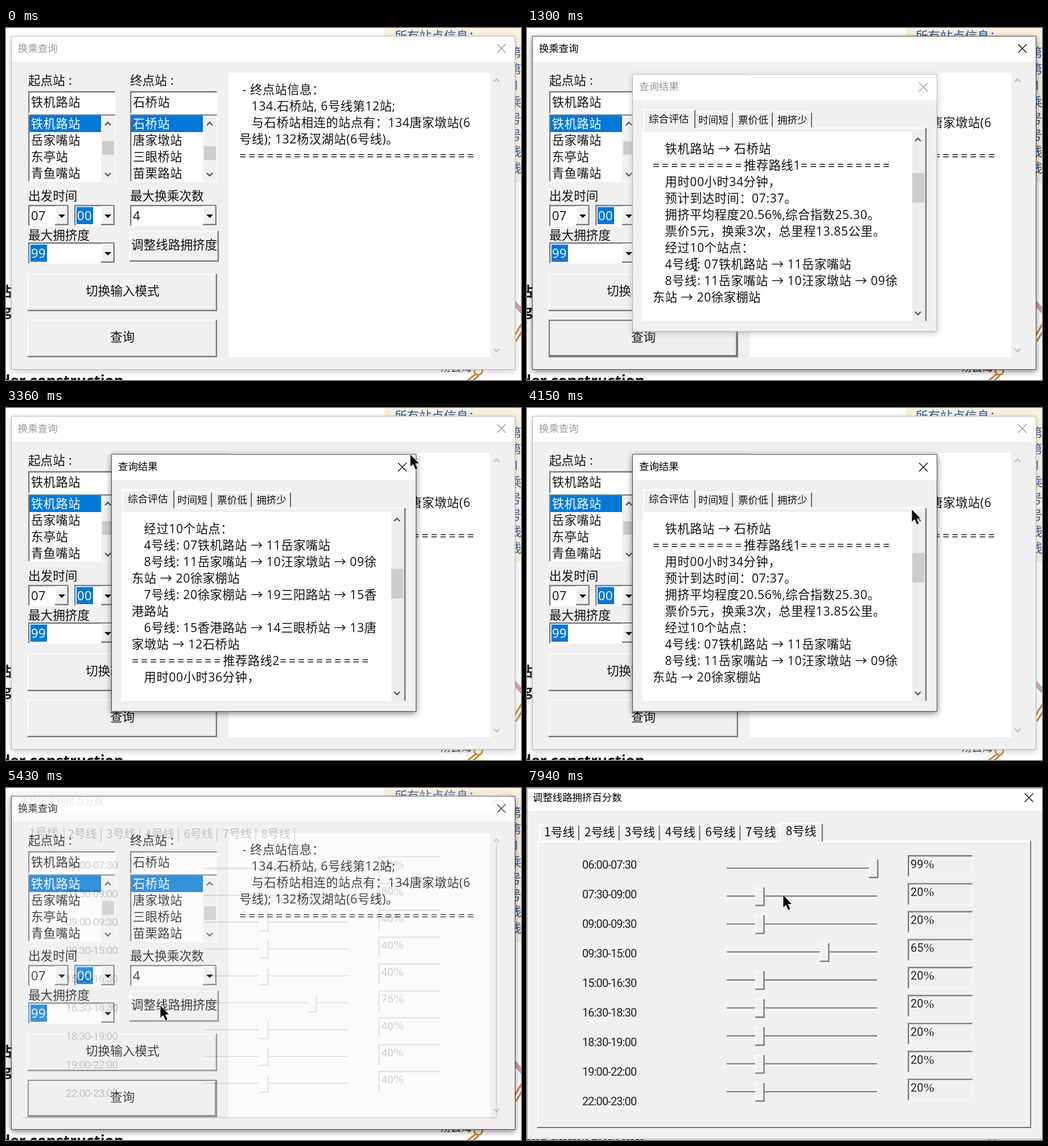
Animation, 905 px wide and 619 px high, one loop 8 s. Source, as an HTML page:

```html
<!DOCTYPE html>
<html lang="zh-CN">
<head>
<meta charset="utf-8">
<title>换乘查询</title>
<style>
  html, body { margin: 0; width: 100%; height: 100%; overflow: hidden; background: #fff; }
  svg { display: block; width: 905px; height: 619px; }
  text { font-family: "Open Sans", "Noto Sans CJK SC", "Noto Sans CJK", sans-serif; }
  .cjk { font-family: "Noto Sans CJK SC", "Noto Sans CJK", sans-serif; }
  .num { font-family: Roboto, sans-serif; }
  .pct { font-family: "Liberation Serif", serif; }
</style>
</head>
<body>
<svg id="stage" viewBox="0 0 905 619"></svg>
<script>
const LOOP = 8000, STEP = LOOP / 104;
const FACE = '#f0f0f0', DARK = '#7c7c7c', BLUE = '#0078d7';

// ---- drawing helpers ----
const rect = (x, y, w, h, fill, extra = '') =>
  `<rect x="${x}" y="${y}" width="${w}" height="${h}" fill="${fill}" ${extra}/>`;
const line = (d, stroke, w = 2, extra = '') =>
  `<path d="${d}" fill="none" stroke="${stroke}" stroke-width="${w}" ${extra}/>`;
// text placed by its left edge and vertical centre
const text = (x, cy, s, size = 21.2, extra = 'fill="#111" letter-spacing=".6"') =>
  `<text x="${x}" y="${cy + size * .33}" font-size="${size}" ${extra}>${s}</text>`;
const label = (x, cy, s, size = 21.6) => text(x, cy + size * .04, s, size, 'class="cjk" fill="#111"');

function bevel(x, y, w, h, fill, lit, shade, litWidth, shadeWidth) {
  const r = x + w, b = y + h, p = litWidth / 2, q = shadeWidth / 2;
  return rect(x, y, w, h, fill) +
    line(`M${x + p} ${b}V${y + p}H${r}`, lit, litWidth) +
    line(`M${r - q} ${y}V${b - q}H${x}`, shade, shadeWidth);
}
const sunk = (x, y, w, h, fill = '#fff') => bevel(x, y, w, h, fill, DARK, '#f8f8f8', 2.4, 1.5);
const raised = (x, y, w, h) => bevel(x, y, w, h, FACE, '#fff', DARK, 1.5, 2.4);
const chevron = (x, y, dir, color = '#555') =>
  line(`M${x - 5} ${y + 3 * dir}L${x} ${y - 2 * dir}L${x + 5} ${y + 3 * dir}`, color, 2.4);
const cross = (x, y) =>
  `<path d="M${x - 7.5} ${y - 7.5}l15 15m0-15l-15 15" fill="none" stroke="currentColor" stroke-width="1.3"/>`;
const title = (x, y, s) => text(x, y + .7, s, 17.4, 'class="cjk" fill="currentColor"');

function paragraph(x, cy, lines) {
  return lines.map((s, i) => {
    const indent = s.length - s.trimStart().length;
    const body = s.trim().replace(/=+/g, m => `<tspan letter-spacing="3.9">${m}</tspan>`);
    return text(x + indent * 5.4, cy + 29 * i, body);
  }).join('');
}

// border and shadow follow the title colour, so an inactive window looks lighter
function frame(x, y, w, h, bar) {
  return rect(x, y + 3, w, h, 'currentColor', 'opacity=".5" filter="url(#soft)"') +
    rect(x, y, w, h, FACE) + rect(x, y, w, bar, '#fff') +
    rect(x + .5, y + .5, w - 1, h - 1, 'none', 'stroke="currentColor" stroke-opacity=".7"');
}

// ---- map behind the windows ----
function backdrop() {
  const bold = 'font-weight="700" fill="#111"', blue = 'fill="#2350a0" font-weight="500"';
  const side = '第第1乘号号线线';
  return rect(0, 0, 905, 619, '#fff') + rect(665, 0, 240, 272, '#faf1de') +
    text(683, 14.5, '所有站点信息：', 21.6, blue) +
    [...side].map((c, i) => text(c === '1' ? 890 : 884, 43.5 + 29 * i, c, 21.6, blue)).join('') +
    text(-14, 464, '站', 24, bold) + text(-21, 498, 'ng', 25, bold) +
    text(-9, 621, 'der construction', 26, bold) +
    text(763, 598, '汤云海', 18.5, 'fill="#222"') +
    line('M890 480L910 502', '#cfa0b4', 8) +
    line('M908 517L890 547M914 521L896 551', '#d08030', 3) +
    line('M825 609L806 624M831 611L816 624', '#d08030', 3) +
    `<circle cx="830" cy="603" r="7" fill="#fff" stroke="#d08030" stroke-width="3"/>`;
}

// ---- query window ----
function station(x, name, items, thumbY) {
  let s = label(x, 92, name) + label(x + 71, 92, ':') +
    sunk(x, 111, 154, 40) + text(x + 5, 131, items[0]) +
    sunk(x, 152, 154, 119) + rect(x + 2, 154, 126, 29, BLUE) + rect(x + 128, 154, 24, 115, FACE) +
    rect(x + 130, thumbY, 21, 24, '#cdcdcd') + chevron(x + 140, 168, 1) + chevron(x + 140, 258, -1);
  items.forEach((it, i) => s += text(x + 5, 169 + 29 * i, it, 21.2,
    `letter-spacing=".6" fill="${i ? '#111' : '#fff'}"`));
  return s;
}

function combo(x, y, w, value, picked) {
  const cx = x + w - 13, cy = y + 19;
  return sunk(x, y, w, 38) + raised(x + w - 25, y + 2, 24, 34) +
    `<path d="M${cx - 6} ${cy - 2}h12l-6 6z"/>` +
    (picked ? rect(x + 4, y + 4, 29, 30, BLUE) : '') +
    text(x + 5, cy + .5, value, 22, `fill="${picked ? '#fff' : '#111'}" letter-spacing=".4"`);
}

const button = (x, y, w, h, tx, s) => raised(x, y, w, h) + label(tx, y + h / 2 - 2.5, s);

function queryWindow() {
  return `<g id="mainBar">${frame(9, 14, 886, 587, 45)}${title(21, 36, '换乘查询')}${cross(870.5, 36)}</g>` +
    station(39, '起点站', ['铁机路站', '岳家嘴站', '东亭站', '青鱼嘴站'], 199) +
    station(218, '终点站', ['石桥站', '唐家墩站', '三眼桥站', '苗栗路站'], 208) +
    label(39, 295, '出发时间') + combo(39, 311, 72, '07') + combo(120, 311, 72, '00', true) +
    label(218, 295, '最大换乘次数') + combo(218, 311, 153, '4') +
    label(39, 364, '最大拥挤度') + combo(39, 377, 153, '99', true) +
    button(217, 357, 157, 54, 220, '调整线路拥挤度') +
    button(38, 432, 333, 66, 140, '切换输入模式') +
    button(38, 513, 333, 66, 183, '查询') +
    `<g id="focus">${rect(39, 514, 331, 64, 'none', 'stroke="#777" stroke-width="2"')}${
      line('M368 516V576H40', DARK, 2)}</g>` +
    rect(391, 79, 460, 500, '#fff') + chevron(862, 92, 1, '#bdbdbd') + chevron(862, 567, -1, '#bdbdbd') +
    paragraph(410, 109, [
      ' - 终点站信息：', '    134.石桥站, 6号线第12站;',
      '    与石桥站相连的站点有：134唐家墩站(6', '号线); 132杨汊湖站(6号线)。', '='.repeat(26)]);
}

// ---- result window ----
const bar = '='.repeat(10);
const report = [
  ' - 起点站信息：', '    93.铁机路站, 4号线第7站;',
  '    与铁机路站相连的站点有：06罗家港', '站(4号线); 11岳家嘴站(4号线)。',
  ' - 终点站信息：', '    134.石桥站, 6号线第12站;',
  '    与石桥站相连的站点有：134唐家墩', '站(6号线); 132杨汊湖站(6号线)。',
  '='.repeat(26), '    铁机路站 → 石桥站', bar + '推荐路线1' + bar,
  '    用时00小时34分钟，', '    预计到达时间：07:37。',
  '    拥挤平均程度20.56%,综合指数25.30。', '    票价5元，换乘3次，总里程13.85公里。',
  '    经过10个站点：', '    4号线: 07铁机路站 → 11岳家嘴站',
  '    8号线: 11岳家嘴站 → 10汪家墩站 → 09徐', '东站 → 20徐家棚站',
  '    7号线: 20徐家棚站 → 19三阳路站 → 15香', '港路站',
  '    6号线: 15香港路站 → 14三眼桥站 → 13唐', '家墩站 → 12石桥站',
  bar + '推荐路线2' + bar, '    用时00小时36分钟，'];

function tab(x, r, y, b, lead) {
  return (lead ? line(`M${x + 1} ${b}V${y + 1}H${r - 2}`, '#fff') : line(`M${x} ${y + 1}H${r - 2}`, '#fff')) +
    line(`M${r - 1} ${y + 2}V${b}`, '#6a6a6a', 2);
}

function resultWindow() {
  const tabs = [['时间短', 301, 296, 362], ['票价低', 371, 364, 432], ['拥挤少', 440, 434, 501]];
  return `<g id="popBar">${frame(185, 81, 536, 453, 46)}${title(197, 103, '查询结果')}</g>` +
    rect(675, 82, 45, 44, '#e81123', 'id="hover"') + `<g id="popX">${cross(696.5, 104)}</g>` +
    line('M296 176H702', '#fff') +
    tabs.map(([s, tx, x, r]) => tab(x, r, 147, 174) + label(tx, 161.5, s, 17.6)).join('') +
    tab(204, 296, 143, 176, true) + label(214, 159.5, '综合评估', 17.6) +
    line('M204 176V515', '#fff') + line('M701 176V515', '#777', 2.5) +
    rect(203, 183, 474, 332, '#fff') + rect(677, 183, 22, 332, '#ededed') +
    chevron(687, 196, 1) + chevron(687, 502, -1) + rect(677, 0, 21, 52, '#cdcdcd', 'id="thumb"') +
    `<g clip-path="url(#page)"><g id="report">${paragraph(221, 213, report)}</g></g>`;
}

// ---- crowding window ----
const hours = ['06:00', '07:30', '09:00', '09:30', '15:00', '16:30', '18:30', '19:00', '22:00', '23:00'];
const routes = [1, 2, 3, 4, 6, 7, 8];

function crowdPanel(sel, values) {
  let s = rect(18, 60, 870, 540, FACE) + line('M19 598V94H886', '#fff') +
    line('M885 93V597H18', '#777');
  routes.forEach((n, i) => {
    const x = 21 + 70.8 * i, on = i === sel;
    if (on) s += rect(x - 1, 62, 74, 34, FACE);
    s += tab(on ? x - 2 : x, x + (on ? 74 : 71), on ? 61 : 64, on ? 94 : 92, on || !i);
    s += label(30 + 70.8 * i, on ? 75 : 77, n + '号线', 21);
  });
  values.forEach((v, i) => {
    const dy = 49.15 * i, cx = 358.6 + 2.53 * v;
    s += text(97, 135 + 52.1 * i, hours[i] + '-' + hours[i + 1], 20, 'class="num" fill="#222" letter-spacing="-.9"') +
      line(`M351 ${141 + dy}H615`, '#777', 2.2) + line(`M351 ${143 + dy}H616`, '#fff', 1.4) +
      raised(cx - 8, 125.5 + dy, 16.5, 33) +
      sunk(669, 118 + dy, 115, 39, FACE) +
      text(674, 134 + dy, v, 20, 'class="num" fill="#222"') +
      text(697, 133.5 + dy, '%', 22, 'class="pct" fill="#222"');
  });
  return s;
}

function crowdWindow() {
  return rect(0, 0, 905, 617.5, FACE) + rect(0, 0, 905, 40, '#fff') +
    line('M.5 618V.5H905', '#a0a0a0', 1) + line('M0 617.5H905', '#999', 1) +
    `<g id="crowdBar">${title(10, 17, '调整线路拥挤百分数')}${cross(882, 17)}</g><g id="panel"></g>`;
}

const stage = document.getElementById('stage');
stage.innerHTML = `<defs>
  <filter id="soft" x="-10%" y="-10%" width="120%" height="120%"><feGaussianBlur stdDeviation="6"/></filter>
  <clipPath id="page"><rect x="203" y="196" width="474" height="293"/></clipPath></defs>` +
  backdrop() + queryWindow() + `<g id="popup">${resultWindow()}</g><g id="crowd">${crowdWindow()}</g>` +
  `<g id="cursor"><circle id="halo" r="17" fill="#fdf76a" opacity=".9"/>
   <path id="arrow" d="M0 0V22.5L5 18L9 27L13 25.3L9.2 16.6H16Z" stroke="#fff" stroke-width=".8"/>
   <path id="beam" d="M-4 -11H-1L0 -10L1 -11H4M0 -10V10M-4 11H-1L0 10L1 11H4" fill="none" stroke="#111" stroke-width="1.6"/></g>`;
const el = {};
stage.querySelectorAll('[id]').forEach(n => el[n.id] = n);

// ---- timing ----
const path = [
  [150, 330, 640], [400, 300, 548], [840, 300, 548], [920, 300, 510], [1220, 297, 416], [1750, 297, 416],
  [2250, 430, 386], [2650, 430, 386], [3100, 700, 92], [3250, 716, 72], [3400, 699, 100], [3600, 697, 104],
  [3950, 676, 178], [4250, 676, 178], [4500, 697, 106], [4750, 697, 106], [5150, 271, 382], [5480, 271, 382],
  [5880, 490, 72], [6300, 490, 72], [6750, 408, 146], [6950, 408, 146], [7610, 640, 160], [7700, 754, 170],
  [7910, 450, 188]];
const scrolls = [[0, 0], [990, 3], [1060, 6], [1220, 9], [1900, 12], [2840, 15], [3680, 12], [3840, 9]];
const clicks = [[380, 520], [2350, 2600], [4640, 4750], [5190, 5330], [6120, 6250]];

const clamp = v => Math.max(0, Math.min(1, v));
const ramp = (t, a, b) => clamp((t - a) / (b - a));
const within = (t, a, b) => t >= a && t < b;
const show = (n, on) => n.setAttribute('visibility', on ? 'inherit' : 'hidden');
const ink = (n, c) => n.setAttribute('color', c);

function cursorAt(t) {
  const i = path.findIndex(k => k[0] > t);
  if (i < 0) return path[path.length - 1].slice(1);
  if (!i) return path[0].slice(1);
  const [a, x, y] = path[i - 1], [b, u, v] = path[i];
  const p = ramp(t, a, b), e = p * p * (3 - 2 * p);
  return [x + (u - x) * e, y + (v - y) * e];
}

let panelKey = '';
function draw(t) {
  const [x, y] = cursorAt(t);
  const mainOn = within(t, 400, 2340) || t >= 5200, popOn = t >= 2340;
  const popIn = ramp(t, 540, 760), popOut = ramp(t, 4700, 4860);
  const popLive = popIn > 0 && popOut === 0;

  ink(el.mainBar, mainOn ? '#000' : '#999');
  show(el.focus, mainOn);

  const grow = .94 + .06 * popIn - .06 * popOut;
  show(el.popup, popIn > 0 && popOut < 1);
  el.popup.setAttribute('opacity', popIn * (1 - popOut));
  el.popup.setAttribute('transform', `translate(453 308) scale(${grow}) translate(-453 -308)`);
  const hover = popLive && within(x, 675, 721) && within(y, 82, 127);
  show(el.hover, hover);
  ink(el.popBar, popOn ? '#000' : '#999');
  ink(el.popX, hover ? '#fff' : popOn ? '#000' : '#999');
  const row = scrolls.filter(s => s[0] <= t).pop()[1];
  el.report.setAttribute('transform', `translate(0 ${-29 * row})`);
  el.thumb.setAttribute('y', 213 + 4.67 * row);

  const open = ramp(t, 5335, 5565), s = .95 + .05 * open;
  show(el.crowd, open > 0);
  el.crowd.setAttribute('opacity', open);
  el.crowd.setAttribute('transform', `translate(${295 * (1 - s)} ${158 * (1 - s)}) scale(${s})`);
  const last = t >= 6130;
  ink(el.crowdBar, last ? '#000' : '#999');
  const pulled = Math.round(Math.max(20, Math.min(99, 20 + (x - 408) / 2.53)));
  const level = t < 6950 ? 20 : t < 7650 ? pulled : 99;
  const key = last ? '8/' + level : '1';
  if (key !== panelKey) {
    panelKey = key;
    el.panel.innerHTML = last
      ? crowdPanel(6, [level, 20, 20, 65, 20, 20, 20, 20, 20])
      : crowdPanel(0, [40, 80, 40, 40, 40, 75, 40, 40, 40]);
  }

  const inPage = popLive && within(x, 203, 677) && within(y, 183, 515);
  el.cursor.setAttribute('transform', `translate(${x} ${y})`);
  show(el.cursor, t >= 150);
  show(el.beam, inPage);
  show(el.arrow, !inPage);
  show(el.halo, clicks.some(([a, b]) => within(t, a, b)));
}

function tick(now) {
  draw(Math.floor((now % LOOP) / STEP + .15) * STEP);
  requestAnimationFrame(tick);
}
draw(0);
requestAnimationFrame(tick);
</script>
</body>
</html>
```
